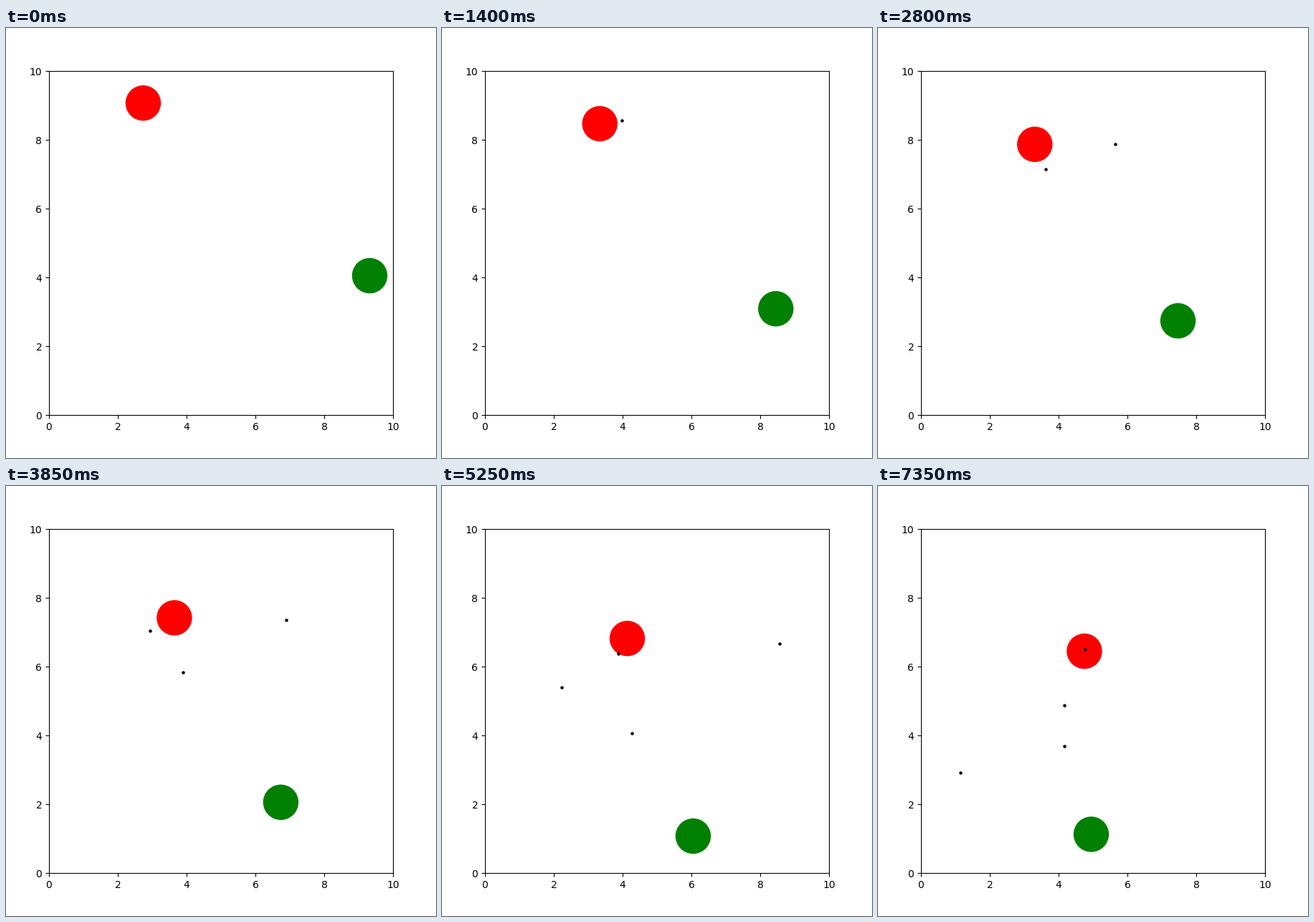
Recreate the animation shown at these times as a matplotlib script. Size 600 by 600 pixels, loop 7700 ms.

```python
import numpy as np
import matplotlib.pyplot as plt
from matplotlib.animation import FuncAnimation

FRAMES, INTERVAL = 22, 350
RADIUS = 0.5
SHOT_SPEED, RELOAD = 0.45, 4
SHOT_ANGLES = np.radians([-22.4, -78.1, -113.6, -83.5, -92.65, -90])

# Turning points: step, x, y
RED_TURNS = [(0, 2.738, 9.068), (4, 3.338, 8.468), (8, 3.308, 7.868),
             (9, 3.356, 7.718), (11, 3.644, 7.418), (17, 4.382, 6.518),
             (20, 4.771, 6.49), (21, 4.75, 6.448)]
GREEN_TURNS = [(0, 9.323, 4.05), (1, 9.185, 3.8), (5, 8.211, 2.852),
               (7, 7.715, 2.88), (8, 7.471, 2.738), (11, 6.738, 2.056),
               (13, 6.302, 1.563), (17, 5.8, 0.583), (19, 5.392, 0.671),
               (21, 4.948, 1.125)]


def walk(turns, step):
    """Position at a step, at steady speed between turning points."""
    t, x, y = np.transpose(turns)
    return np.array([np.interp(step, t, x), np.interp(step, t, y)])


def shots_at(step):
    """Shots in flight; each leaves the red disc and vanishes on a hit."""
    shots = []
    for k, angle in enumerate(SHOT_ANGLES):
        age = step - 1 - k * RELOAD
        if age < 0:
            break
        heading = np.array([np.cos(angle), np.sin(angle)])
        pos = walk(RED_TURNS, k * RELOAD) + age * SHOT_SPEED * heading
        if np.hypot(*(pos - walk(GREEN_TURNS, step))) > RADIUS:
            shots.append(pos)
    return np.array(shots).reshape(-1, 2)


fig = plt.figure(figsize=(6, 6), dpi=100)
ax = fig.add_axes([0.1, 0.1, 0.8, 0.8])
ax.set(xlim=(0, 10), ylim=(0, 10))

red = ax.add_patch(plt.Circle((0, 0), RADIUS, color="red"))
green = ax.add_patch(plt.Circle((0, 0), RADIUS, color="green"))
dots = ax.scatter([], [], s=5, color="black", zorder=2)


def update(step):
    red.center = walk(RED_TURNS, step)
    green.center = walk(GREEN_TURNS, step)
    dots.set_offsets(shots_at(step))
    return red, green, dots


anim = FuncAnimation(fig, update, frames=FRAMES, interval=INTERVAL,
                     repeat=True, repeat_delay=0)
plt.show()
```
